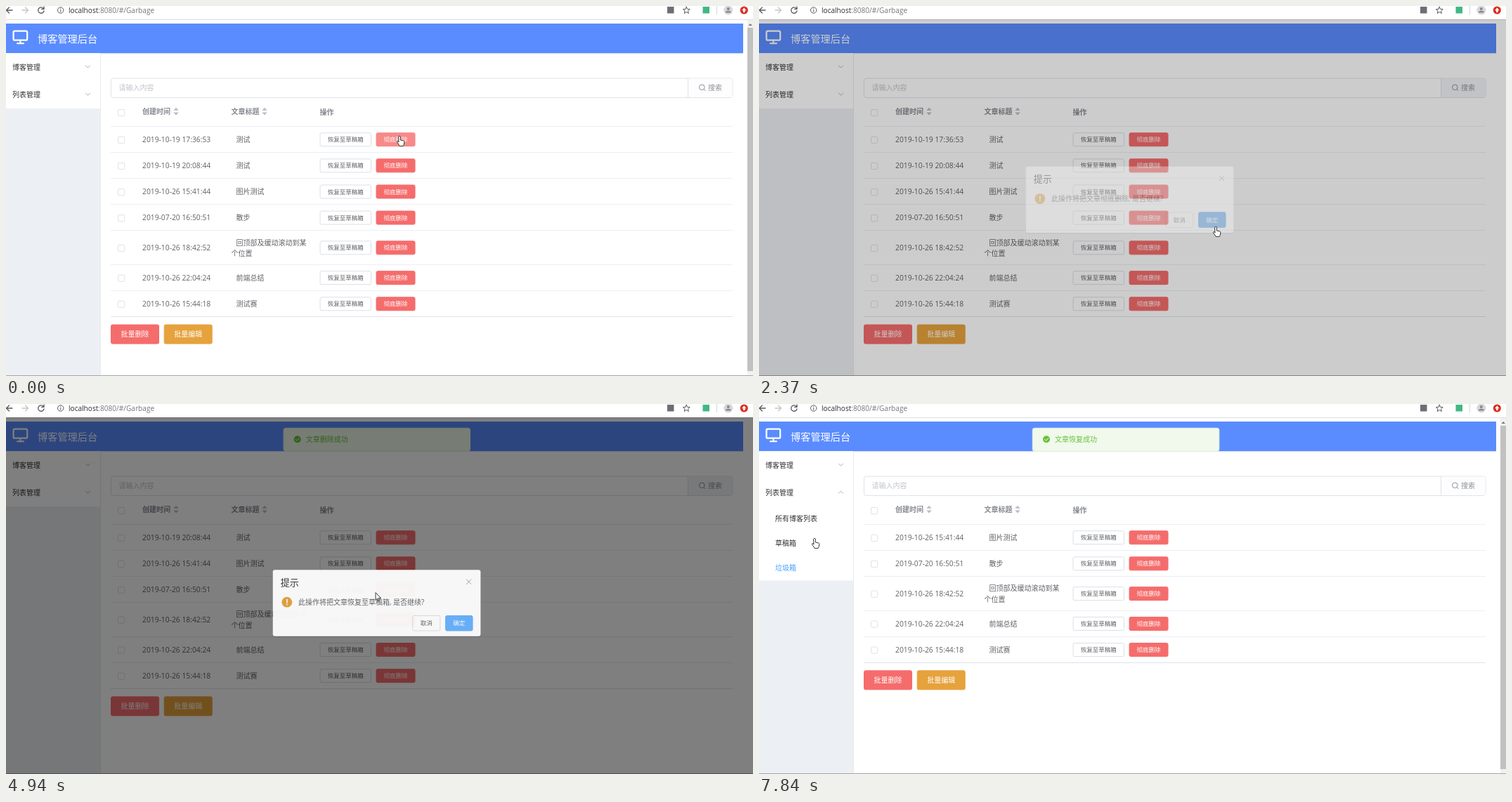
An HTML page that plays this animation: 1063 px wide and 527 px high, repeating every 7.99 s.

```html
<!DOCTYPE html>
<html lang="zh">
<head>
<meta charset="utf-8">
<title>博客管理后台</title>
<style>
html, body { margin: 0; width: 100%; height: 100%; overflow: hidden; background: #fff; }
svg { display: block; width: 100%; height: 100%; }
text { font-family: "Open Sans", "Noto Sans CJK SC", "Noto Sans CJK", sans-serif; white-space: pre; }
</style>
</head>
<body>
<svg id="stage" viewBox="0 0 1063 527"></svg>
<script>
const LOOP = 7990;
const stage = document.getElementById('stage');

// Stepped tracks: [time, value...]
const pointerTrack = [
  [0, 560, 185, 1], [670, 504, 267, 0], [790, 375, 322, 0], [940, 406, 347, 0],
  [1090, 530, 340, 0], [1210, 639, 325, 0], [1360, 650, 314, 1], [2520, 650, 314, 0],
  [2880, 625, 295, 0], [3000, 590, 260, 0], [3120, 550, 219, 1], [3270, 482, 189, 1],
  [4940, 526, 269, 0], [5060, 552, 296, 0], [5180, 585, 324, 0], [5330, 607, 312, 1],
  [5480, 644, 316, 1], [6300, 644, 316, 0], [6610, 185, 247, 0], [6760, 110, 212, 0],
  [6880, 11, 171, 0], [7030, 40, 125, 1], [7150, 66, 119, 1], [7570, 68, 140, 1],
  [7690, 75, 170, 1], [7840, 79, 191, 1]
];
const maskTrack = [[0, 0], [520, .02], [670, .5], [2370, .2], [2520, 0], [4670, .1], [4790, .4], [4940, .5], [6180, .2], [6300, 0]];
const dialogTrack = [[0, 0], [670, .83], [790, 1], [2370, .35], [2520, 0], [4790, .5], [4940, .94], [5060, 1], [6180, .35], [6300, 0]];
const toastTrack = [[0, 0], [2520, .45], [2640, 1], [5180, .8], [5330, 0], [6450, 1]];
const menuTrack = [[0, 0], [7450, .3], [7570, .75], [7690, 1]];

const articles = [
  ['2019-10-19 17:36:53', '测试'],
  ['2019-10-19 20:08:44', '测试'],
  ['2019-10-26 15:41:44', '图片测试'],
  ['2019-07-20 16:50:51', '散步'],
  ['2019-10-26 18:42:52', '回顶部及缓动滚动到某', '个位置'],
  ['2019-10-26 22:04:24', '前端总结'],
  ['2019-10-26 15:44:18', '测试赛']
];

const held = (track, t) => track.filter(k => k[0] <= t).pop().slice(1);
const within = (t, from, to) => t >= from && t < to;

const rect = (x, y, w, h, fill, extra = '') =>
  `<rect x="${x}" y="${y}" width="${w}" height="${h}" fill="${fill}" ${extra}/>`;
const circle = (x, y, r, fill, extra = '') => `<circle cx="${x}" cy="${y}" r="${r}" fill="${fill}" ${extra}/>`;
const stroke = (d, color, width = 1, fill = 'none') =>
  `<path d="${d}" fill="${fill}" stroke="${color}" stroke-width="${width}" stroke-linecap="round" stroke-linejoin="round"/>`;
const hline = (x, y, w, color) => rect(x, y, w, 1, color);
// y is the vertical centre of the glyphs
const text = (x, y, str, size, fill, extra = '') =>
  `<text x="${x}" y="${y + size * .37}" font-size="${size}" fill="${fill}" ${extra}>${str}</text>`;
const button = (x, y, w, h, label, size, fill, color, border = fill) =>
  rect(x + .5, y - h / 2 + .5, w - 1, h - 1, fill, `stroke="${border}" rx="2"`) +
  text(x + w / 2, y, label, size, color, 'text-anchor="middle"');
const group = (inner, x, y, opacity = 1) => `<g transform="translate(${x} ${y})" opacity="${opacity}">${inner}</g>`;

function browserBar() {
  return rect(0, 0, 1063, 19, '#fff') + hline(0, 19, 1063, '#dadce0') +
    stroke('M9 6H1M4.5 2L.5 6l4 4', '#55595e', 1.3) +
    stroke('M23 6h8M27.5 2l4 4l-4 4', '#c4c6c9', 1.3) +
    stroke('M53 3.2A4.2 4.2 0 1 0 54 7M54 1v3.4h-3.4', '#55595e', 1.3) +
    circle(77.7, 6, 4.2, 'none', 'stroke="#55595e"') + rect(77.2, 5.4, 1.1, 3, '#55595e') + rect(77.2, 3.4, 1.1, 1.1, '#55595e') +
    text(89, 6, 'localhost<tspan fill="#73777b">:8080/#/Garbage</tspan>', 10.1, '#2b2d30') +
    rect(941, 1, 9.5, 9.5, '#6b6f75') +
    stroke('M968.3 1.2l1.4 3.2 3.5.3-2.7 2.3.9 3.5-3.1-1.9-3.1 1.9.9-3.5-2.7-2.3 3.5-.3z', '#55595e') +
    rect(991.5, 1, 9.5, 9.5, '#41b883') + rect(1011, 0, 1, 12, '#d4d6d9') +
    circle(1027.8, 6, 6.5, '#d5d7da') + circle(1027.8, 4, 2, '#84888d') +
    `<path d="M1023.8 9.6q0-2.8 4-2.8t4 2.8z" fill="#84888d"/>` +
    circle(1050.3, 6, 5.6, '#d93025') + `<path d="M1050.3 2.6l3.2 3.6h-2v2.8h-2.4V6.200h-2z" fill="#fff"/>`;
}

function header() {
  return rect(0, 25, 1049, 42.3, '#5a8cff') +
    rect(10.6, 35.7, 19.6, 13, 'none', 'stroke="#fff" stroke-width="2.2" rx="1.8"') +
    stroke('M20.400 49v4M16 53.300h9', '#fff', 2) +
    text(45, 47, '博客管理后台', 14.2, '#fff');
}

function sidebar(open) {
  const chevron = (y, up) => stroke(`M113.500 ${y + (up ? 1.5 : -1.5)}l3 ${up ? -3 : 3}l3 ${up ? 3 : -3}`, '#a0a3a9', .9);
  const bottom = 146 + 105.5 * open;
  let out = rect(0, 67.3, 134, 460, '#eceff4') + rect(0, 67.3, 134, bottom - 67.3, '#fff') +
    rect(134, 67.3, 1, 460, '#e8eaed') +
    text(9, 87, '博客管理', 10, '#303133') + chevron(86.5) +
    text(9, 126, '列表管理', 10, '#303133') + chevron(125.7, open > 0);
  if (open) {
    const items = ['所有博客列表', '草稿箱', '垃圾箱']
      .map((s, i) => text(23, 163.3 + 35.1 * i, s, 10, i === 2 ? '#409eff' : '#303133')).join('');
    out += `<clipPath id="menu">${rect(0, 146, 134, 105.5 * open, '#000')}</clipPath>` +
      `<g clip-path="url(#menu)" opacity="${open}">${items}</g>`;
  }
  return out;
}

function searchBox(dimmed) {
  return rect(149.5, 103, 884.5, 27.5, '#fff', 'stroke="#dfe2e8" rx="3"') +
    rect(970.5, 103.500, 63, 26.500, dimmed ? '#f2f4f7' : '#fdfdfe') + rect(970, 103, 1, 27.5, '#dfe2e8') +
    text(160.5, 116.7, '请输入内容', 10, '#bfc3cb') +
    circle(990.3, 115.8, 3.8, 'none', 'stroke="#8d9096"') + stroke('M993.2 118.700l2 2', '#8d9096') +
    text(999, 116.7, '搜索', 10, '#8d9096');
}

function table(t) {
  const dropped = t < 2520 ? 0 : t < 6450 ? 1 : 2;
  const check = y => rect(159.5, y - 4.6, 9.2, 9.2, '#fff', 'stroke="#dfe2e8" rx="1.5"');
  const carets = x => `<path d="M${x - 3.7} 148.800l3.700-4 3.700 4zm0 2.600l3.700 4 3.700-4z" fill="#b9bdc5"/>`;
  const head = (x, y, s) => text(x, y, s, 10, '#85888f', 'font-weight="700"');
  let out = check(152) + head(194, 150, '创建时间') + carets(242) + head(320.5, 150, '文章标题') + carets(368) +
    head(446.5, 151.7, '操作') + hline(149, 171, 885, '#ebeef5');
  let y = 171.7;
  articles.slice(dropped).forEach(([date, title, rest], i) => {
    const h = rest ? 48.5 : 37.1, mid = y + h / 2;
    const restoreHot = i === 0 && within(t, 3270, 4790);
    const pressed = i === 0 && within(t, 520, 670);
    const deleteHot = restoreHot || (i === 0 && t < 520) || (i === 1 && within(t, 3120, 3270));
    if (restoreHot) out += rect(149, y + .3, 885, h - 1, '#fafbfd');
    out += check(mid + .6) + text(194, mid, date, 10.3, '#606266');
    out += rest
      ? text(327.5, mid - 7.5, title, 10, '#606266') + text(320.5, mid + 8, rest, 10, '#606266')
      : text(327.5, mid, title, 10, '#606266');
    out += restoreHot
      ? button(446.5, mid, 73.5, 20, '恢复至草稿箱', 8.5, '#ecf5ff', '#409eff', '#c6e2ff')
      : button(446.5, mid, 73.5, 20, '恢复至草稿箱', 8.5, '#fff', '#606266', '#dcdfe6');
    out += button(526.5, mid, 56, 20, '彻底删除', 8.5, pressed ? '#dd6161' : deleteHot ? '#f78989' : '#f56c6c', '#fff');
    y += h;
    out += hline(149, Math.round(y - .7), 885, '#ebeef5');
  });
  return out + hline(149, Math.round(y - .7), 885, '#dfe3ea') +
    button(149, y + 24.7, 69, 28, '批量删除', 10, '#f56c6c', '#fff') +
    button(224.7, y + 24.7, 69, 28, '批量编辑', 10, '#e6a23c', '#fff');
}

function scrollbar() {
  return rect(1055, 20, 8, 507, '#f1f1f1') + rect(1055, 31, 8, 489, '#c1c1c1') +
    `<path d="M1056.500 28l2.700-3 2.700 3z" fill="#777"/>`;
}

function toast(label, shown, shift) {
  return group(
    rect(389.3, 34.3, 265.5, 33, '#f0f9eb', 'stroke="#e1f3d8" rx="3"') +
    circle(409, 50.300, 5, '#67c23a') + stroke('M406.600 50.400l1.800 1.800l3.200-3.400', '#fff') +
    text(421, 50.7, label, 10, '#67c23a'), shift, -25 * (1 - shown), shown);
}

function dialog(message, shown, pressed, cancelHot) {
  return group(
    rect(379.5, 237, 296.5, 96, '#000', 'opacity=".1" rx="4"') +
    rect(379.7, 237, 295.7, 94.5, '#fff', 'rx="3"') +
    text(390.7, 254.6, '提示', 13, '#303133') +
    stroke('M655.400 250.800l6.400 6.400m0-6.400l-6.400 6.400', '#909399', .9) +
    circle(399.8, 283, 7.4, '#e6a23c') + rect(399, 278.7, 1.7, 5.5, '#fff') + rect(399, 285.5, 1.7, 1.7, '#fff') +
    text(416, 283, message, 10, '#606266') +
    (cancelHot
      ? button(578.3, 313, 40, 22.5, '取消', 8.5, '#ecf5ff', '#409eff', '#c6e2ff')
      : button(578.3, 313, 40, 22.5, '取消', 8.5, '#fff', '#606266', '#dcdfe6')) +
    button(625, 313, 39.5, 22.5, '确定', 8.5, pressed ? '#3a8ee6' : '#66b1ff', '#fff'),
    0, -13 * (1 - shown), shown);
}

function pointer(x, y, hand) {
  const shape = hand
    ? 'M-1.3 1q1.3-2 2.600 0v5l4 .8q1.600.5 1.500 2l-.6 3.600l-1 2h-5.200l-1.200-2.200l-2.400-3.600q.2-1.600 1.600-.8l.7.9z'
    : 'M0 0V10.500L2.400 8.200L4 12L5.500 11.300L3.900 7.600H7.200Z';
  return group(stroke(shape, '#222', .9, '#fff'), x, y);
}

function render(t) {
  const [mask] = held(maskTrack, t), [dlg] = held(dialogTrack, t);
  const [note] = held(toastTrack, t), [menu] = held(menuTrack, t);
  const first = t < 4000;
  let out = rect(0, 0, 1063, 527, '#fff') + header() + sidebar(menu) + searchBox(mask > .1) + table(t);
  if (!mask) out += scrollbar();
  out += hline(0, 526, 1063, '#a3a5a8');
  if (note) out += toast(t < 6000 ? '文章删除成功' : '文章恢复成功', note, mask ? 5.7 : 0);
  out += browserBar();
  if (mask) out += rect(0, 19, 1063, 508, '#000', `opacity="${mask}"`);
  if (dlg) {
    out += dialog(`此操作将把文章${first ? '彻底删除' : '恢复至草稿箱'}, 是否继续?`, dlg,
      within(t, 2100, 2520) || within(t, 6030, 6300), within(t, 5330, 5480));
  }
  return out + pointer(...held(pointerTrack, t));
}

let shownMarkup = '';
const start = performance.now();
function tick() {
  const markup = render((performance.now() - start) % LOOP);
  if (markup !== shownMarkup) stage.innerHTML = shownMarkup = markup;
  requestAnimationFrame(tick);
}
tick();
</script>
</body>
</html>
```
